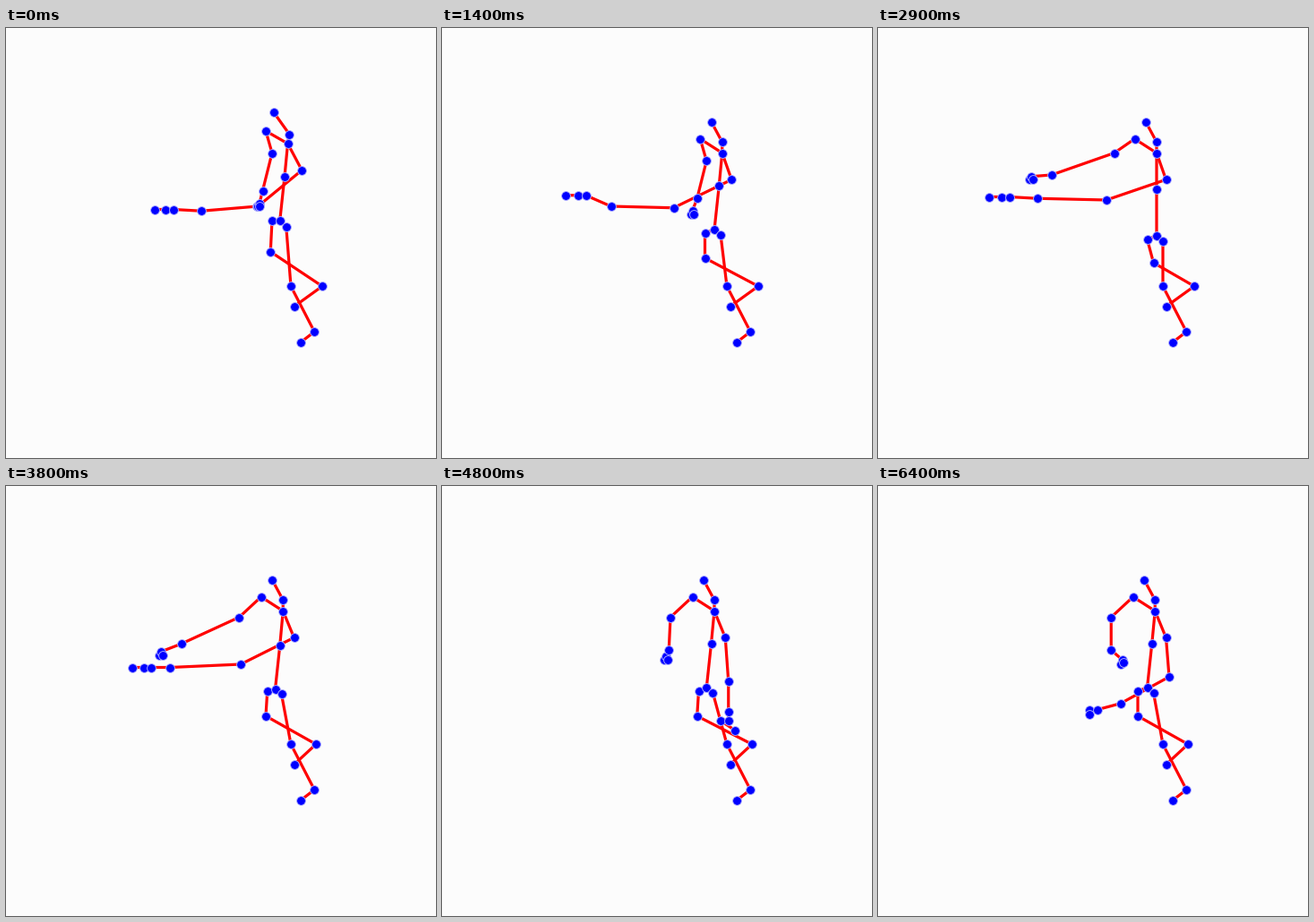
Write a matplotlib script that moves like this. It is 480 px wide and 480 px high and loops after 6.5 s.

```python
import numpy as np
import matplotlib.pyplot as plt
from matplotlib.animation import FuncAnimation

SIZE, DPI = 480, 72
FRAMES, STEP = 65, 100
CELL = 1.75                      # joints snap to a coarse grid of this pitch

# Sideways drift of the chest: time, x in grid cells.
DRIFT = [(0, 180), (38, 177), (48, 174), (56, 173), (64, 177)]

# Arm key poses: time, then upper arm, forearm and palm as vectors.
NEAR_POSES = [
    (0, 4.5, 14.5, -6, 24, -3, 7.5),      # hanging
    (14, 4.5, 14.5, -6, 24, -3, 7.5),
    (29, -13, 9, -40, 14, -13, 1),        # held out
    (38, -14, 13, -37, 17, -13, 5),
    (48, -14, 13, -1, 21, -2, 4),         # bent
    (56, -14, 13, 0, 21, 7, 6.5),
]
FAR_POSES = [
    (0, -28, 23, -36, 3, -18, -1),        # held out
    (14, -37, 18, -40, -1, -16, -7),
    (29, -38, 13, -44, -1, -18, -1),
    (38, -34, 17, -44, 2, -12, 0),
    (42, -28, 22, -38, 10, -11, 3),
    (48, 2, 28, 0, 19, 0, 6),             # hanging
    (52, 17, 25, 14, 17, 6, 8),           # swung back
    (56, 18, 28, -1, 20, 3, 9),
    (64, 2, 25, -31, 17, -15, 4),         # coming forward
]


def blend(keys, t):
    """Interpolate rows of (time, values...) at time t."""
    times, *columns = zip(*keys)
    return np.array([np.interp(t, times, c) for c in columns])


def bump(t, mid, width):
    return np.exp(-((t - mid) / width) ** 2)


def arm(shoulder, poses, t):
    bones = blend(poses, t).reshape(3, 2)
    return np.vstack([shoulder, shoulder + np.cumsum(bones, axis=0)])


def pose(t):
    """Joint chains in pixels: trunk, two arms, two legs."""
    crouch = 1 - np.exp(-t / 4)
    dip = bump(t, 29, 4)
    x = blend(DRIFT, t)[0]
    hip = x - 5 + 5 * dip

    chest = (x, 74 + 6 * crouch)
    pelvis = (hip, 123 + 6.5 * crouch + 4 * dip)
    trunk = [(x - 7 - 2 * (1 - crouch), 54 + 6 * crouch),
             (x + 1 - crouch, 68 + 5 * crouch),
             chest,
             ((x + hip) / 2 + 0.5, 95 + 6.5 * crouch + 1.5 * dip),
             pelvis]

    near_arm = arm((x - 14, 66 + 5 * crouch), NEAR_POSES, t)
    hand = near_arm[-1]
    near_arm = [chest, *near_arm, hand + (1, 2), hand + (-1, 2.5)]

    far_arm = arm((x + 9 - 2.5 * crouch, 91 + 6 * crouch), FAR_POSES, t)
    far_arm[2:, 0] -= 9 * bump(t, 33, 2.2)
    fore = far_arm[2] - far_arm[1]
    hang = max(0, fore[1] / np.hypot(*fore))
    hand = far_arm[-1]
    far_arm = [chest, *far_arm, hand + (-5, 0),
               hand + (-13 + 17 * hang, 6 * hang)]

    tuck = np.clip((38 - t) / 9, 0, 1)
    near_leg = [pelvis,
                (hip - 5.5, 123 + 8 * crouch + 4 * dip),
                (hip - 6 + 4.5 * dip, 143 + 4 * crouch + 3 * dip),
                (198 + 4 * tuck, 165),
                (184.5, 178)]
    far_leg = [pelvis,
               (hip + 4, 127 + 5.5 * crouch + 4 * dip),
               (182, 165.4), (197.4, 194), (188, 201)]

    chains = [trunk, near_arm, far_arm, near_leg, far_leg]
    return [np.round(np.array(c)) * CELL - 0.5 for c in chains]


fig = plt.figure(figsize=(SIZE / DPI, SIZE / DPI), dpi=DPI, facecolor="#fcfcfc")
ax = fig.add_axes([0, 0, 1, 1])
ax.set_xlim(0, SIZE)
ax.set_ylim(SIZE, 0)
ax.axis("off")

bones = [ax.plot([], [], color="red", lw=3.2, zorder=1)[0] for _ in range(5)]
dots, = ax.plot([], [], "o", ms=9.8, mfc="blue", mec="#b0b0ff", mew=0.9, zorder=2)


def draw(frame):
    chains = pose(frame)
    for bone, chain in zip(bones, chains):
        bone.set_data(chain[:, 0], chain[:, 1])
    # Shared joints are drawn once so their rims stay crisp.
    joints = np.unique(np.vstack(chains), axis=0)
    dots.set_data(joints[:, 0], joints[:, 1])
    return [*bones, dots]


anim = FuncAnimation(fig, draw, frames=FRAMES, interval=STEP,
                     repeat=True, repeat_delay=0, blit=False)
plt.show()
```
